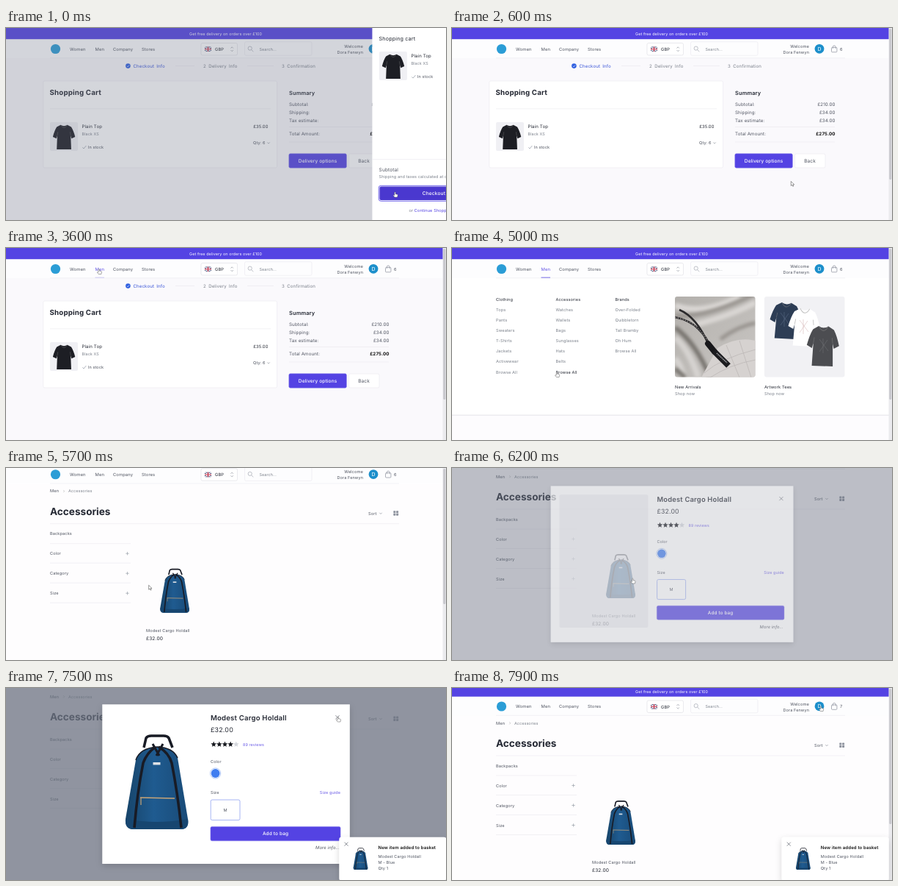
An HTML page that plays this animation: 600 by 261 pixels, repeating every 8000 ms.

```html
<!DOCTYPE html>
<html lang="en">
<head>
<meta charset="utf-8">
<title>Shop checkout</title>
<style>
  html, body { margin: 0; width: 100%; height: 100%; overflow: hidden; background: #fff; }
  svg { display: block; width: 600px; height: 261px; }
  text {
    font-family: Montserrat, Inter, "Open Sans", sans-serif;
    letter-spacing: .02em;
    text-rendering: geometricPrecision;
    white-space: pre;
  }
</style>
</head>
<body>
<svg id="stage" viewBox="0 0 600 261" xmlns="http://www.w3.org/2000/svg"></svg>
<script>
const INDIGO = '#5443e3', DARK = '#242833', MID = '#505561', SOFT = '#7b808b', RULE = '#e9e8ee';
const USER = 'Dora Fenwyn', TOP = 'Plain Top', BAG = 'Modest Cargo Holdall';

// Drawing helpers
const text = (x, y, s, size = 5.6, fill = MID, extra = '') =>
  `<text x="${x}" y="${y}" font-size="${size}" fill="${fill}" ${extra}>${s}</text>`;
const rect = (x, y, w, h, fill, r = 0, extra = '') =>
  `<rect x="${x}" y="${y}" width="${w}" height="${h}" rx="${r}" fill="${fill}" ${extra}/>`;
const line = (d, stroke = RULE, w = .6, extra = '') =>
  `<path d="${d}" fill="none" stroke="${stroke}" stroke-width="${w}" ${extra}/>`;
const circle = (x, y, r, fill, extra = '') =>
  `<circle cx="${x}" cy="${y}" r="${r}" fill="${fill}" ${extra}/>`;
const group = (id, body, extra = '') => `<g id="${id}" ${extra}>${body}</g>`;
const END = 'text-anchor="end"', CENTER = 'text-anchor="middle"';
const weight = n => `font-weight="${n}"`;
const cross = (x, y, r) =>
  line(`M${x - r} ${y - r}l${2 * r} ${2 * r}m0 ${-2 * r}l${-2 * r} ${2 * r}`, '#5b606b', .7);
const chevron = (x, y, r = 1.7) => line(`M${x - r} ${y - r / 2}l${r} ${r}l${r} ${-r}`, SOFT, .6);
const button = (x, y, w, h, label) =>
  rect(x, y, w, h, INDIGO, 2, 'stroke="#8478ec" stroke-opacity=".6" stroke-width=".8"') +
  text(x + w / 2, y + h / 2 + 2.3, label, 6.5, '#fff', CENTER + ' ' + weight(500));

const tee = (x, y, sx, sy, fill, turn = 0) =>
  `<g transform="translate(${x} ${y}) rotate(${turn}) scale(${sx} ${sy})">
    <path d="M12 1Q18 4 24 1L31 4Q35 9 38 18L31.500 20.500L30 16L31 36H5L6 16L4.500 20.500L-2 18Q1 9 5 4Z" fill="${fill}"/>
    <path d="M12 1Q18 9 24 1M6 16L7 11M30 16L29 11" fill="none" stroke="#888" stroke-opacity=".5" stroke-width=".8"/>
  </g>`;

const satchel = (x, y, k) =>
  `<g transform="translate(${x} ${y}) scale(${k})">
    <path d="M15 36Q20 20 44 18Q66 19 72 33L86 116Q88 129 78 130H10Q0 129 1 116Z" fill="url(#canvas)"/>
    <path d="M1 116Q0 129 10 130H78Q88 129 86 116Q44 124 1 116Z" fill="#174670"/>
    <g fill="none" stroke="#181b25" stroke-linejoin="round">
      <path d="M26 19L29 6Q31 3 36 3H53Q58 3 60 6L65 19" stroke-width="3.500"/>
      <path d="M42 18Q30 26 25 40Q17 80 13 128M46 18Q60 26 64 40Q72 80 77 128" stroke-width="3.600"/>
      <path d="M38 14L47 30M52 14L43 30" stroke-width="3"/>
      <path d="M15 36Q20 20 44 18Q66 19 72 33" stroke-width="1.500"/>
    </g>
    <path d="M21 87L68 88" stroke="#c9a577" stroke-width="1.600"/>
    <path d="M22 87V97" stroke="#c9a577" stroke-width="1.200"/>
    <rect x="38.500" y="39" width="10" height="3.500" fill="#dfe2e6"/>
  </g>`;

const inStock = (x, y) =>
  line(`M${x} ${y - 2}l1.700 1.700l3.300 -4`, '#8f96a3', .7) + text(x + 7.6, y, 'In stock', 5.5, MID);
const teeCard = (x, y) =>
  rect(x, y, 38, 39, '#f0f0f4', 2) + tee(x + 5.4, y + 2.8, .76, .95, '#1d1e24');

function header() {
  const flag = rect(271, 25.5, 9, 6.5, '#35406f') +
    line('M271 25.5l9 6.5m0 -6.5l-9 6.5', '#fff', 1.1) +
    line('M275.5 25.5v6.5M271 28.750h9', '#fff', 2.2) +
    line('M275.5 25.5v6.5M271 28.750h9', '#c8324a', 1.2);
  return rect(0, 15, 600, 26, '#fdfdfe') + rect(0, 0, 600, 15.2, INDIGO) +
    text(299.5, 10, 'Get free delivery on orders over £100', 5.4, '#fff', CENTER) +
    circle(67.5, 28.5, 6.6, '#2b9dd6') +
    text(87, 30.7, 'Women', 5.9) +
    `<text id="men" x="121.500" y="30.700" font-size="5.900">Men</text>` +
    text(146, 30.7, 'Company', 5.8) + text(185, 30.7, 'Stores', 5.8) +
    rect(121.5, 39.7, 12.5, 1.2, INDIGO, 0, 'id="under"') +
    rect(266, 20.5, 49.5, 16.5, '#fff', 2, 'stroke="#dcdce3" stroke-width=".6"') + flag +
    text(285, 31, 'GBP', 5.8, DARK) +
    line('M306.500 27.500l1.700 -1.700l1.700 1.700M306.500 30l1.700 1.700l1.700 -1.700', SOFT) +
    rect(325.5, 18.7, 91.5, 18.6, '#fdfdfe', 2, `stroke="${RULE}" stroke-width=".6"`) +
    circle(332.7, 27.6, 2.6, 'none', 'stroke="#a2a6b0" stroke-width=".7"') +
    line('M334.700 29.600l2.600 2.600', '#a2a6b0', .7) +
    text(345.5, 30.6, 'Search...', 5.4, SOFT) +
    text(487, 27.2, 'Welcome', 5.7, MID, END) + text(487, 35, USER, 5.5, MID, END) +
    circle(501, 28.3, 6.4, '#1c8fcb') + text(501, 30.9, 'D', 7, '#fff', CENTER) +
    rect(517.5, 26.4, 7.4, 6.4, 'none', 1, 'stroke="#8a8f9b" stroke-width=".7"') +
    line('M519.300 28v-2.200a1.900 1.900 0 0 1 3.800 0v2.200', '#8a8f9b', .7) +
    `<text id="count" x="529" y="30.700" font-size="5.700" fill="${MID}"></text>` +
    line('M60 40.8H536', RULE);
}

function cartPage() {
  const rows = [['Subtotal:', '£210.00', 105.5], ['Shipping:', '£34.00', 116.5], ['Tax estimate:', '£34.00', 127.5]];
  const gap = 'word-spacing="1.500"';
  return circle(166.4, 51.6, 3.3, '#2f5fe0') + line('M164.900 51.700l1.100 1.100l2 -2.300', '#fff', .7) +
    text(173.5, 53.9, 'Checkout Info', 6.1, '#3b56d8', gap) +
    text(269, 53.9, '2 Delivery Info', 6.1, SOFT, gap) +
    text(376, 53.9, '3 Confirmation', 6.1, SOFT, gap) +
    line('M231 51.500H257M329 51.500H365') +
    rect(50.8, 72, 318.8, 118, '#fff', 2, 'stroke="#ecebf1" stroke-width=".7"') +
    text(59.5, 91, 'Shopping Cart', 9.7, DARK, weight(700)) + line('M60 109.800H361') +
    teeCard(60, 128) + text(103.5, 135.7, TOP, 6.1, DARK) +
    text(103.5, 145.5, 'Black XS', 5.4, SOFT) + inStock(104.3, 164.3) +
    text(357.5, 135.8, '£35.00', 5.9, DARK, END) +
    text(337, 158.2, 'Qty: 6', 5.6) + chevron(358, 156.3) +
    text(386, 90.5, 'Summary', 7.4, DARK, weight(600)) +
    rows.map(([a, b, y]) => text(386, y, a, 6.2) + text(522.5, y, b, 6.2, MID, END)).join('') +
    line('M386 134.500H522M386 155H522') +
    text(386, 146.4, 'Total Amount:', 6.2) + text(522.5, 146.4, '£275.00', 6.2, '#111', END + ' ' + weight(700)) +
    button(385.8, 170.8, 78.6, 19.4, 'Delivery options') +
    rect(467.5, 171, 41.5, 19, '#fff', 2, `stroke="${RULE}" stroke-width=".6"`) +
    text(488, 182.8, 'Back', 6.5, MID, CENTER);
}

function menu() {
  const lists = [
    [60, 'Clothing', 'Tops,Pants,Sweaters,T-Shirts,Jackets,Activewear,Browse All'],
    [141.5, 'Accessories', 'Watches,Wallets,Bags,Sunglasses,Hats,Belts,Browse All'],
    [222.5, 'Brands', 'Over-Folded,Quibbletorn,Tall Bramby,Oh Hum,Browse All']
  ];
  const columns = lists.map(([x, head, items]) => text(x, 72.1, head, 5.6, DARK) +
    items.split(',').map((s, i) => text(x, 86.2 + i * 14.05, s, 5.6, SOFT,
      head === 'Accessories' && s === 'Browse All' ? 'id="pick"' : '')).join('')).join('');
  const folds = (d, shade, w) => line(d, shade, w, 'filter="url(#soft)"');
  const bagPhoto = `<g clip-path="url(#photo)">` + rect(304, 66, 110, 110, 'url(#grey)') +
    folds('M304 78Q340 92 392 66M332 104Q380 92 414 74', '#d9d6d3', 8) +
    folds('M304 92Q345 96 414 62M366 124Q390 106 414 102', '#96928d', 5) +
    folds('M304 122Q322 136 336 176M304 150Q312 158 316 176', '#d6d3d0', 8) +
    folds('M304 108Q332 128 352 176M304 164L318 176', '#77736e', 6) +
    `<path d="M362 136Q388 120 414 126V176H340Q352 154 362 136Z" fill="#d6d2d0"/>` +
    line('M344 170Q366 150 414 138M352 176Q380 158 414 152M374 132L392 176M392 126L408 176', '#bdb8b6', .8) +
    line('M304 94Q324 98 336 110T352 134M310 84Q334 94 350 132', '#2b2a2c', 2.6) +
    line('M304 94Q324 98 336 110T352 134', '#c9c7c5', 1, 'stroke-dasharray="1.500 2"') +
    line('M349 130L358 141', '#17171a', 8, 'stroke-linecap="round"') +
    line('M357 140L377 160', '#1c1c1f', 8) + line('M361 143L375 156', '#a5a5a8', 1.6, 'stroke-dasharray="1.500 .800"') + '</g>';
  const print = (x, y, shade) => line(`M${x} ${y}l12 16m-1 -15l-11 16m5 -18v20`, shade, .8, 'stroke-opacity=".7"');
  const teePhoto = rect(426, 66, 109.5, 109.5, '#f1f1f4', 3) +
    tee(437, 72, 1.08, 1.4, '#2d3d55', 3) + print(448, 88, '#5c6d88') +
    tee(462, 80, 1.08, 1.45, '#fff', 3) + print(474, 98, '#d5b6b5') +
    tee(487, 104, 1.1, 1.55, '#4c4d51', 2) + print(501, 124, '#707176');
  const caption = (x, s) => text(x, 190.8, s, 5.7, DARK) + text(x, 200.2, 'Shop now', 5.6, SOFT);
  return rect(0, 41, 600, 220, '#fdfcfe') + rect(0, 41, 600, 186, '#fff') +
    line('M0 227.2H600', '#dedee4', .8) + columns +
    bagPhoto + teePhoto + caption(304, 'New Arrivals') + caption(426, 'Artwork Tees');
}

function listPage() {
  const filters = [['Color', 138], ['Category', 165], ['Size', 192]];
  const squares = [0, 1, 2, 3].map(i => rect(528.3 + i % 2 * 3.8, 78 + (i >> 1) * 3.6, 3, 2.9, '#8e939e', .4)).join('');
  return text(60, 53.2, 'Men', 5.7) + line('M78.300 49.800l1.400 1.500l-1.400 1.500', '#aaa', .6) +
    text(85, 53.2, 'Accessories', 5.4, SOFT) +
    text(60, 83.6, 'Accessories', 13.6, DARK, weight(700) + ' style="letter-spacing:0"') +
    text(494, 83.5, 'Sort', 5.6) + chevron(511, 81.4) + squares +
    line('M60 95.5H536') + text(60, 111.2, 'Backpacks', 5.6) + line('M60 122.500H170') +
    filters.map(([s, y]) => text(60, y, s, 5.6) + line(`M60 ${y + 11}H170`) +
      line(`M163.300 ${y - 2}h4.400m-2.200 -2.200v4.400`, '#9a9fa9', .7)).join('') +
    satchel(209.8, 156, .465) + text(191, 242.6, BAG, 5.6) + text(191, 253.5, '£32.00', 6.6, DARK);
}

function panel() {
  return rect(499.5, 0, 170, 261, '#fff') + text(508.7, 17.3, 'Shopping cart', 7.2, DARK) +
    teeCard(509, 32) + text(552.5, 39.8, TOP, 6.1, DARK) + text(552.5, 49.6, 'Black XS', 5.4, SOFT) +
    inStock(553.5, 68.4) + line('M499.5 178.500H668') +
    text(508.7, 194.5, 'Subtotal', 6.5) + text(508.7, 204, 'Shipping and taxes calculated at checkout.', 5.5, SOFT) +
    rect(508.3, 214.3, 150, 21, '#fff', 3, 'stroke="#7468ea" stroke-width="1"') +
    rect(509.5, 215.5, 147.6, 18.6, '#4a38cf', 2) +
    text(583.5, 227.2, 'Checkout', 6.6, '#fff', CENTER + ' ' + weight(500)) +
    text(549.5, 249.8, 'or <tspan fill="#5443e3">Continue Shopping →</tspan>', 5.6, SOFT);
}

function star(x, y, r, fill) {
  const points = Array.from({ length: 10 }, (_, i) => {
    const a = i * Math.PI / 5, k = i % 2 ? r * .45 : r;
    return `${(x + k * Math.sin(a)).toFixed(2)},${(y - k * Math.cos(a)).toFixed(2)}`;
  });
  return `<polygon points="${points.join(' ')}" fill="${fill}"/>`;
}

function modal() {
  return rect(131.3, 22.3, 337.5, 216.7, '#fff', 0, 'filter="url(#shadow)"') +
    rect(143.3, 34.3, 123.5, 184.5, '#f1f1f4', 2) +
    group('photoBig', rect(143, 34, 124, 185, '#fff') + satchel(162, 62, 1)) +
    text(279, 44.3, BAG, 9.6, DARK, weight(600)) + text(279, 60.2, '£32.00', 8.9, DARK) +
    [0, 1, 2, 3, 4].map(i => star(283.2 + i * 7.65, 76.6, 4, i < 4 ? '#15171d' : '#d3d6dc')).join('') +
    text(323, 78.6, '89 reviews', 5.4, '#6a5be6') +
    text(279, 101.9, 'Color', 5.5) +
    circle(285.6, 116, 7.1, '#fff', 'stroke="#a3bff5" stroke-width=".9"') + circle(285.6, 116, 5.9, '#3f7df0') +
    text(279, 144, 'Size', 5.5) + text(456, 144, 'Size guide', 5.5, '#6a5be6', END) +
    rect(279.2, 152, 39.8, 27.6, '#fff', 2, 'stroke="#9dadf3" stroke-width=".9"') +
    text(299, 167.8, 'M', 5.6, MID, CENTER) +
    button(278.9, 188.4, 177.2, 19.4, 'Add to bag') +
    text(455, 219.3, 'More info...', 5.9, MID, END + ' font-style="italic"') + cross(452, 39.8, 2.6);
}

const toast = () =>
  rect(454.3, 202.7, 146, 59, '#fff', 3, 'filter="url(#shadow)"') + cross(464, 212.2, 2.5) +
  satchel(473.5, 217, .23) +
  text(507.5, 219.2, 'New item added to basket', 6.05, '#111', weight(600)) +
  text(507.5, 231, BAG, 5.5) + text(507.5, 239, 'M - Blue', 5.5) + text(507.5, 246.6, 'Qty 1', 5.5);

const pointers =
  group('arrow', '<path d="M0 0V6L1.500 4.700L2.500 6.900L3.500 6.400L2.600 4.400H4.400Z" fill="#fff" stroke="#333" stroke-width=".5"/>') +
  group('hand', '<path d="M-.7 .6Q0 -.4 .7 .6V2.700L3.200 3.300Q3.900 3.600 3.700 4.500L3.100 7H-.6L-2.500 4.500Q-2.300 3.500 -.7 4.500Z" fill="#fff" stroke="#555" stroke-width=".5"/>');

const stage = document.getElementById('stage');
stage.innerHTML = `<defs>
    <clipPath id="photo"><rect x="304" y="66" width="109.500" height="109.500" rx="3"/></clipPath>
    <linearGradient id="grey" x2="1" y2="1"><stop stop-color="#b3b0ac"/><stop offset="1" stop-color="#c9c6c3"/></linearGradient>
    <linearGradient id="canvas"><stop stop-color="#174469"/><stop offset=".45" stop-color="#1f5b90"/><stop offset="1" stop-color="#194b78"/></linearGradient>
    <filter id="soft"><feGaussianBlur stdDeviation="2"/></filter>
    <filter id="shadow" x="-10%" y="-20%" width="120%" height="140%">
      <feDropShadow dx="0" dy="3" stdDeviation="4" flood-color="#000" flood-opacity=".16"/></filter>
  </defs>` +
  rect(0, 0, 600, 261, '#faf9fc', 0, 'id="back"') +
  group('page', group('cart', cartPage()) + group('list', listPage()) + group('menu', menu()) + header()) +
  group('bar', rect(595.5, 0, 4.5, 261, '#ebebee') + rect(596.2, 1, 3.2, 1, '#c8c8cd', 1.5, 'id="thumb"')) +
  rect(0, 0, 600, 261, '#6b7280', 0, 'id="veil"') +
  group('panel', panel()) + group('modal', modal()) + group('toast', toast()) + group('pointer', pointers);

const el = {};
stage.querySelectorAll('[id]').forEach(n => el[n.id] = n);

// Motion helpers
const smooth = x => x * x * (3 - 2 * x);
const easeOut = x => 1 - (1 - x) ** 2;
const easeIn = x => x * x;
const ramp = (t, a, b, ease = smooth) => ease(Math.min(1, Math.max(0, (t - a) / (b - a))));
const set = (node, name, value) => node.setAttribute(name, value);
const show = (node, on) => set(node, 'display', on ? 'inline' : 'none');
const move = (node, x, y) => set(node, 'transform', `translate(${x} ${y})`);

// time, x, y
const PATH = [
  [0, 530.5, 223], [200, 530.5, 223], [900, 418, 199], [1600, 279.5, 165], [1800, 279.5, 165],
  [3400, 126.8, 28.5], [3900, 126.8, 28.5], [4900, 143, 168.5], [5400, 143, 168.5],
  [6000, 246.3, 150], [6300, 246.3, 150], [6800, 366, 196], [7000, 366, 196],
  [7400, 452.8, 39], [7600, 452.8, 39], [7900, 503, 24.5]
];
const ARROW_TIMES = [[300, 3300], [4000, 4700], [5600, 5900], [6400, 6700], [7100, 7300], [7650, 7850]];

function pointerAt(t) {
  const i = PATH.findIndex(k => k[0] > t);
  if (i < 0) return PATH[PATH.length - 1].slice(1);
  const [a, b] = [PATH[i - 1], PATH[i]], p = ramp(t, a[0], b[0]);
  return [1, 2].map(j => a[j] + (b[j] - a[j]) * p);
}

function draw(t) {
  const onList = t >= 5400;
  const scroll = onList ? 39.5 * ramp(t, 5500, 5900) - 36 * ramp(t, 7600, 7900, easeOut) : 0;
  const open = ramp(t, 6090, 6390, easeOut) * (1 - ramp(t, 7550, 7750, easeIn));
  const veil = (1 - ramp(t, -290, 210)) + open;
  const slide = 168 * ramp(t, -309, 400) - 68;
  const under = onList ? 0 : ramp(t, 3500, 3750);

  move(el.page, 0, -scroll);
  set(el.back, 'fill', onList ? '#fefdfe' : '#faf9fc');
  show(el.cart, !onList);
  show(el.list, onList);
  show(el.menu, !onList && t > 3600);
  set(el.menu, 'opacity', ramp(t, 3600, 3800, easeOut));
  set(el.pick, 'fill', t >= 4800 ? DARK : SOFT);
  set(el.under, 'opacity', under * .9);
  set(el.men, 'fill', under > .2 ? '#6254e4' : MID);
  el.count.textContent = t < 7000 ? 6 : 7;

  show(el.bar, t >= 400 && open === 0);
  set(el.thumb, 'height', onList ? 184 : 205);
  set(el.veil, 'opacity', veil * .75);
  show(el.panel, slide < 100);
  move(el.panel, slide.toFixed(2), 0);

  show(el.modal, open > 0);
  set(el.modal, 'opacity', open);
  set(el.modal, 'transform', `translate(300 130.600) scale(${.95 + .05 * open}) translate(-300 -130.600)`);
  show(el.photoBig, t >= 6500);

  const arrive = ramp(t, 7000, 7300, easeOut);
  show(el.toast, arrive > 0);
  set(el.toast, 'opacity', arrive);
  move(el.toast, (1 - arrive) * 12 - (open === 0 ? 4.7 : 0), 0);

  const arrow = ARROW_TIMES.some(([a, b]) => t >= a && t < b);
  show(el.arrow, arrow);
  show(el.hand, !arrow);
  move(el.pointer, ...pointerAt(t));
}

const LOOP = 8000, STEP = 100, start = performance.now();
function tick() {
  const t = (performance.now() - start) % LOOP;
  draw(Math.floor(t / STEP) * STEP);
  requestAnimationFrame(tick);
}
tick();
</script>
</body>
</html>
```
